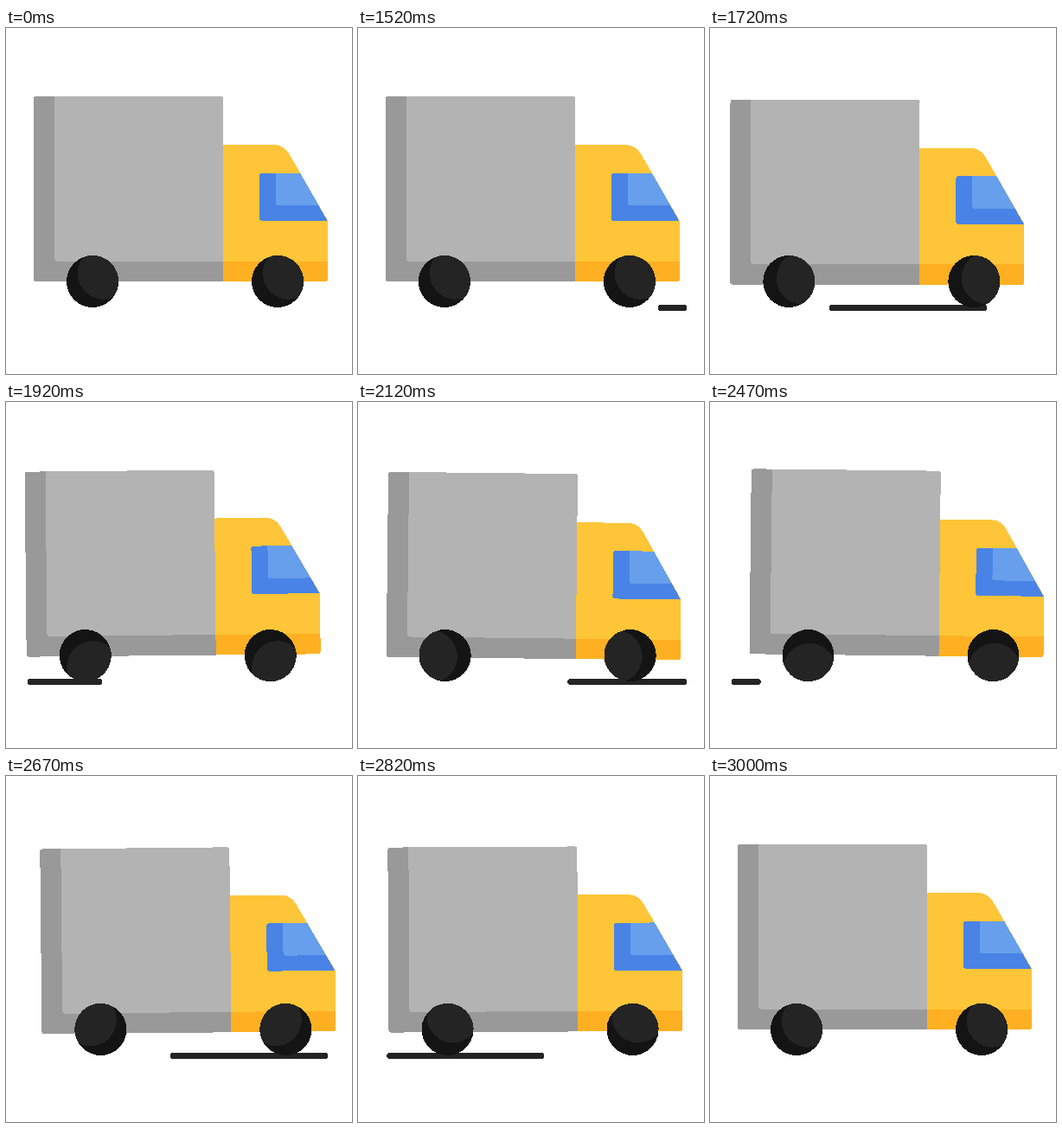
These frames come from a looping animation (400 px wide and 400 px high, 3020 ms). An HTML page:

```html
<!DOCTYPE html>
<html lang="en">
<head>
<meta charset="utf-8">
<title>Delivery truck</title>
<style>
  html, body { margin: 0; width: 100%; height: 100%; overflow: hidden; background: #fff; }
  svg { display: block; width: 100%; height: 100%; }
  svg * { shape-rendering: crispEdges; }
</style>
</head>
<body>
<svg viewBox="0 0 400 400">
  <defs>
    <g id="wheel">
      <circle r="30" fill="#141414"/>
      <path fill="#242424" d="M-10.600 -28.100A30 30 0 0 1 23.600 18.600A30 30 0 0 1 -10.600 -28.100Z"/>
    </g>
  </defs>
  <rect id="road" y="320" height="7" rx="3" fill="#242424"/>
  <g id="body">
    <path fill="#ffc538" d="M250 135H311Q321 135.500 327 145L371 221Q372 222.500 372 224V271H250Z"/>
    <path fill="#ffb022" d="M250 269.500H372V290Q372 293 369 293H250Z"/>
    <path fill="#4983e6" d="M296 167.500H340L371.500 222.800H296Q293 222.800 293 219.800V170.500Q293 167.500 296 167.500Z"/>
    <path fill="#679fec" d="M312 167.500H340L361.400 205H315Q312 205 312 202Z"/>
    <path fill="#999" d="M35 79H70V260H251V293H35Q32 293 32 290V82Q32 79 35 79Z"/>
    <path fill="#b3b3b3" d="M56 79H248.500Q251 79 251 81.500V269.500H59Q56 269.500 56 266.500Z"/>
  </g>
  <use id="rear" href="#wheel"/>
  <use id="front" href="#wheel"/>
</svg>
<script>
const LOOP = 3020, REST = 1500, DRIVE = 1500, PASS = 500, STEP = 25;
const LEFT = 25, RIGHT = 380, AXLE = 293;
const $ = id => document.getElementById(id);
const road = $('road'), body = $('body'), rear = $('rear'), front = $('front');

const ease = u => (1 - Math.cos(Math.PI * u)) / 2;

// Eased travel between [time, value] poses, counted from the start of the drive
function swing(poses, d) {
  const i = Math.max(1, poses.findIndex(p => p[0] >= d));
  const [t0, v0] = poses[i - 1], [t1, v1] = poses[i];
  return v0 + (v1 - v0) * ease((d - t0) / (t1 - t0));
}

const roll = [[0, 0], [300, -10.2], [985, 13.5], [DRIVE, 0]];
const rock = [[0, 0], [100, 0.5], [390, -0.62], [640, 0.64], [960, 0.64], [1160, -0.58], [DRIVE, 0]];

// Three bounces, each a little longer than the last
const bounce = u => 4 * Math.sin(3 * Math.PI * u ** 0.87) ** 2;
const spin = u => 720 * ease(u ** 1.15);

// A dash of fixed length runs left and is cut off at both ends
function drawRoad(d) {
  const q = d % PASS, run = 1.045 * q;
  const head = Math.max(LEFT, RIGHT - 7 - run);
  const tail = Math.min(RIGHT, RIGHT + 175 - run);
  road.setAttribute('x', head);
  road.setAttribute('width', q ? Math.max(0, tail - head) : 0);
}

function place(wheel, x, angle) {
  wheel.setAttribute('transform', `translate(${x} ${AXLE}) rotate(${angle})`);
}

function draw(ms) {
  const step = STEP * Math.floor((ms % LOOP + 5) / STEP);
  const d = Math.min(DRIVE, Math.max(0, step - REST)), u = d / DRIVE;
  const x = swing(roll, d);
  body.setAttribute('transform', `translate(${x} ${bounce(u)}) rotate(${swing(rock, d)} 202 ${AXLE})`);
  place(rear, 100 + x, spin(u));
  place(front, 314 + x, spin(u));
  drawRoad(d);
}

let begin = null;
function tick(now) {
  if (begin === null) begin = now;
  draw(now - begin);
  requestAnimationFrame(tick);
}
draw(0);
requestAnimationFrame(tick);
</script>
</body>
</html>
```
